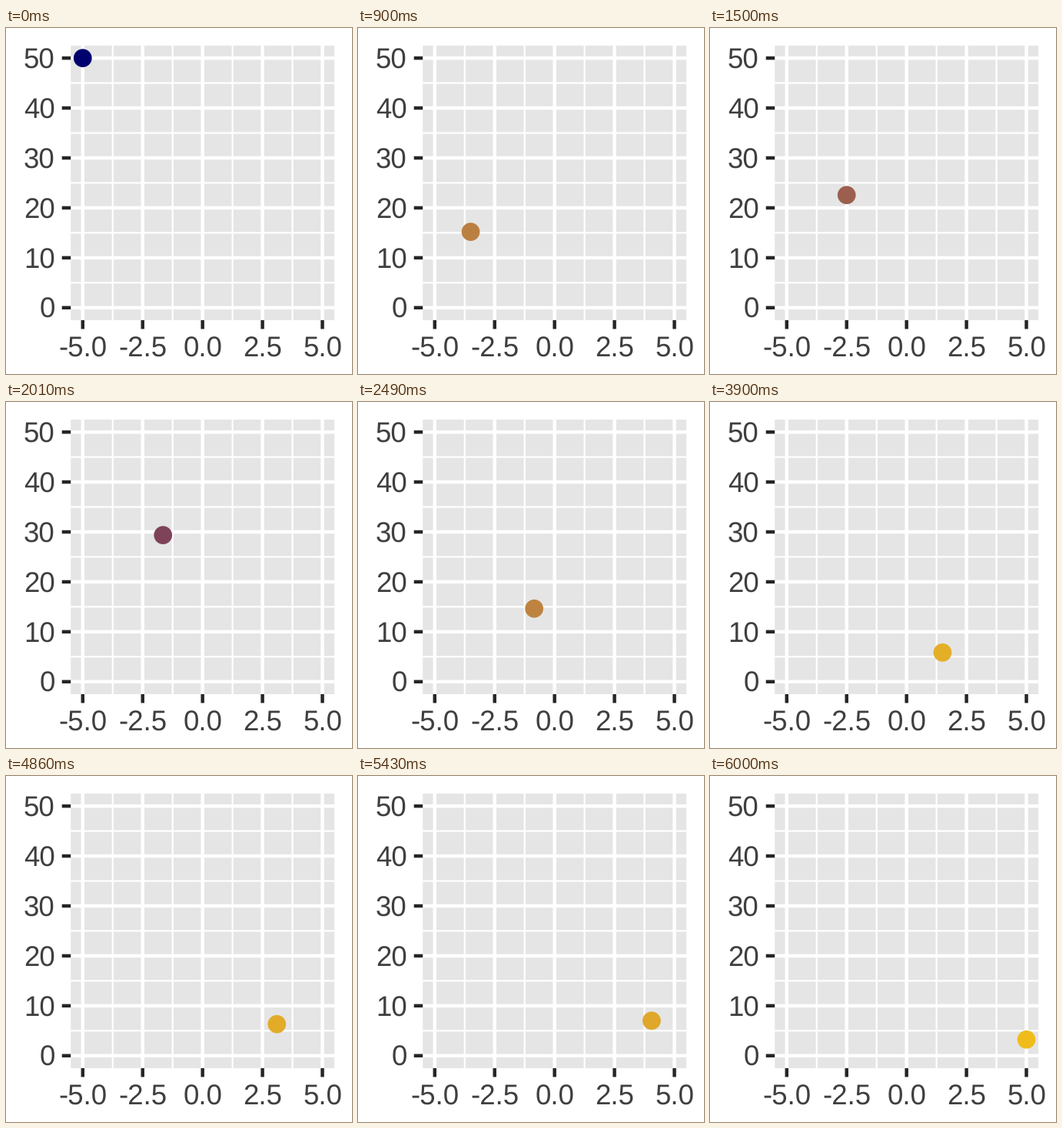
Recreate the animation shown at these times as a matplotlib script. Size 450x450 px, loop 6030 ms.

```python
import numpy as np
import matplotlib.pyplot as plt
from matplotlib.animation import FuncAnimation
from matplotlib.patches import Circle, Rectangle

plt.rcParams["font.family"] = "Liberation Sans"
plt.rcParams["text.hinting"] = "none"

SIZE, DPI = 450, 100
FRAMES, INTERVAL = 201, 30
LEFT, RIGHT, TOP, BOTTOM = 84.2, 427.1, 22.9, 380.0
PANEL, LABEL, TICK = "#e5e5e5", "#3f3f3f", "#252525"
TONE = 1.22  # display gamma of the point colours


def px(x):
    return LEFT + (x + 5.5) / 11 * (RIGHT - LEFT)


def py(y):
    return BOTTOM - (y + 2.5) / 55 * (BOTTOM - TOP)


def pt(pixels):
    return pixels * 72 / DPI


def bounce(n, y=50.0, g=32.0, dt=0.05, rebound=0.75):
    """Heights of a dropped ball, stepped with explicit Euler."""
    v, heights = 0.0, []
    for _ in range(n):
        heights.append(y)
        y += v * dt
        v -= g * dt
        if y < 0:
            v *= -rebound
    return np.array(heights)


RGB_XYZ = np.array([[0.4124, 0.3576, 0.1805],
                    [0.2126, 0.7152, 0.0722],
                    [0.0193, 0.1192, 0.9505]])
WHITE = RGB_XYZ.sum(axis=1)


def to_lab(rgb):
    c = np.array(rgb) / 255
    c = np.where(c > 0.04045, ((c + 0.055) / 1.055) ** 2.4, c / 12.92)
    f = RGB_XYZ @ c / WHITE
    f = np.where(f > 0.008856, np.cbrt(f), 7.787 * f + 16 / 116)
    return f


def from_lab(f):
    xyz = np.where(f > 0.2069, f ** 3, (f - 16 / 116) / 7.787) * WHITE
    c = np.clip(np.linalg.solve(RGB_XYZ, xyz), 0, 1)
    return np.where(c > 0.0031308, 1.055 * c ** (1 / 2.4) - 0.055, 12.92 * c)


GOLD, NAVY = to_lab((255, 215, 0)), to_lab((0, 0, 128))
xs = np.linspace(-5, 5, FRAMES)
ys = bounce(FRAMES)
low = ys.min()


def colour(y):
    t = (y - low) / (50 - low)
    return np.clip(from_lab(GOLD + (NAVY - GOLD) * t), 0, 1) ** TONE


fig = plt.figure(figsize=(SIZE / DPI, SIZE / DPI), dpi=DPI, facecolor="white")
ax = fig.add_axes([0, 0, 1, 1])
ax.set_xlim(0, SIZE)
ax.set_ylim(SIZE, 0)
ax.axis("off")


def line(x, y, color, width, z):
    ax.plot(x, y, color=color, lw=pt(width), solid_capstyle="butt",
            snap=False, zorder=z)


def label(x, y, text, ha):
    ax.text(x, y, text, ha=ha, va="baseline", color=LABEL, fontsize=pt(36.67))


ax.add_patch(Rectangle((LEFT, TOP), RIGHT - LEFT, BOTTOM - TOP,
                       fc=PANEL, lw=0, snap=False, zorder=0))

for x in np.arange(-3.75, 5, 2.5):
    line([px(x)] * 2, [TOP, BOTTOM], "white", 2.22, 1)
for y in range(5, 50, 10):
    line([LEFT, RIGHT], [py(y)] * 2, "white", 2.22, 1)

for x in np.arange(-5, 5.1, 2.5):
    line([px(x)] * 2, [TOP, BOTTOM], "white", 4.45, 2)
    line([px(x)] * 2, [BOTTOM, BOTTOM + 11.46], TICK, 4.45, 2)
    label(px(x), 427.6, f"{x:.1f}", "center")
for y in range(0, 51, 10):
    line([LEFT, RIGHT], [py(y)] * 2, "white", 4.45, 2)
    line([LEFT - 11.46, LEFT], [py(y)] * 2, TICK, 4.45, 2)
    label(LEFT - 20.6, py(y) + 13.3, str(y), "right")

ball = ax.add_patch(Circle((0, 0), 11.84, lw=0, zorder=5))


def update(i):
    # heights below the axis limit are not shown
    ball.set_visible(bool(ys[i] >= 0))
    ball.center = px(xs[i]), py(ys[i])
    ball.set_facecolor(colour(ys[i]))
    return (ball,)


anim = FuncAnimation(fig, update, frames=FRAMES, interval=INTERVAL,
                     repeat=True, repeat_delay=0, blit=False)
plt.show()
```
